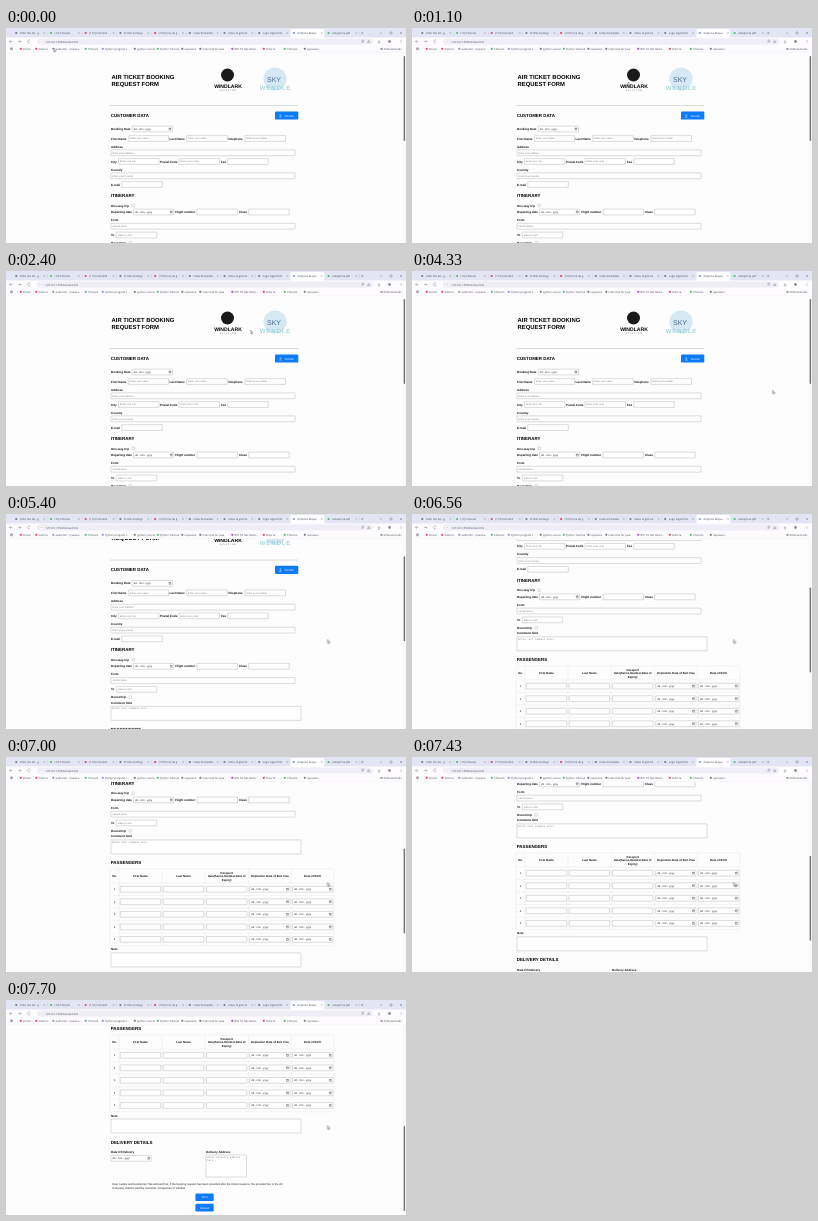
Animation of 400x215 px, one loop 8000 ms. Source, as an HTML page:

```html
<!DOCTYPE html>
<html lang="en">
<head>
<meta charset="utf-8">
<title>Air ticket booking</title>
<style>
  @property --scroll { syntax: "<number>"; inherits: true; initial-value: 0; }

  html, body { margin: 0; width: 100%; height: 100%; overflow: hidden; background: #fefdfe; }
  svg {
    display: block; width: 400px; height: 215px;
    font-family: "Liberation Sans", Arial, sans-serif;
    text-rendering: geometricPrecision;
    animation: scroll 8s linear infinite;
  }
  #page { transform: translateY(calc(var(--scroll) * -1px)); }
  #thumb { transform: translateY(calc(var(--scroll) * .45px)); }
  #cursor { animation: pointer 8s ease-in-out infinite; }

  .title { font-weight: 700; font-size: 5.9px; }
  .head { font-weight: 700; font-size: 4.45px; }
  .label { font-weight: 700; font-size: 3px; fill: #111; }
  .th { font-weight: 700; font-size: 2.9px; fill: #111; text-anchor: middle; }
  .hint { font-size: 2.5px; fill: #808080; }
  .date { font-size: 2.6px; fill: #222; }
  .mono { font-family: "Liberation Mono", monospace; font-size: 2.5px; fill: #808080; }
  .note { font-size: 2.78px; fill: #222; }
  .btn { font-size: 2.8px; fill: #fff; text-anchor: middle; }
  .field { fill: #fff; stroke: #888; stroke-width: .3; }
  .ui { font-family: "Open Sans", sans-serif; font-size: 2.7px; fill: #444a55; }
  .icon { fill: none; stroke: #6a707c; stroke-width: .4; }

  @keyframes scroll {
    0%, 57.875% { --scroll: 0; animation-timing-function: ease-in-out; }
    61.25%, 65.75% { --scroll: 20.8; }
    67.5% { --scroll: 31.5; }
    68.25%, 72.875% { --scroll: 41.6; animation-timing-function: ease-in-out; }
    76.625%, 80% { --scroll: 83.2; }
    82% { --scroll: 101; }
    83.75%, 85.75% { --scroll: 125; }
    87.5% { --scroll: 141; }
    88.75%, 91.625% { --scroll: 146; animation-timing-function: ease-in-out; }
    96.25%, 100% { --scroll: 218; }
  }
  @keyframes pointer {
    0%, .375% { transform: translate(47.5px, 20px); }
    10.375% { transform: translate(222px, 56px); }
    13.75%, 22% { transform: translate(216px, 54px); }
    30%, 32% { transform: translate(244.5px, 59px); }
    42.5% { transform: translate(266px, 58px); }
    50.75%, 57.875% { transform: translate(360.5px, 119px); }
    61.25%, 100% { transform: translate(321.5px, 125.5px); }
  }
</style>
</head>
<body>
<svg viewBox="0 0 400 215">
  <rect width="400" height="215" fill="#fefdfe"/>
  <g id="page"></g>
  <rect x="397" y="25" width="3" height="190" fill="#f9f8fa"/>
  <rect id="thumb" x="397.6" y="28" width="1.5" height="85" rx=".75" fill="#787878"/>
  <g id="browser"></g>
  <path id="cursor" d="M0 0V3.6L.85 2.9 1.4 4.2 1.9 3.9 1.4 2.7H2.5Z" fill="#fff" stroke="#222" stroke-width=".35"/>
</svg>
<script>
const text = (cls, x, y, s, extra = "") => `<text class="${cls}" x="${x}" y="${y}" ${extra}>${s}</text>`;
const rect = (x, y, w, h, fill, r = 0) => `<rect x="${x}" y="${y}" width="${w}" height="${h}" rx="${r}" fill="${fill}"/>`;
const dot = (x, y, r, fill) => `<circle cx="${x}" cy="${y}" r="${r}" fill="${fill}"/>`;
const icon = d => `<path class="icon" d="${d}"/>`;
const box = (x, y, w, h) => `<rect class="field" x="${x}" y="${y}" width="${w}" height="${h}" rx=".3"/>`;

// Form parts; y is the vertical centre of the row
const label = (x, y, s) => text("label", x, y + 1, s);
const input = (x, y, hint = "", w = 40.5) => box(x, y - 2.9, w, 5.8) + text("hint", x + 1.4, y + .9, hint);
const date = (x, y) => box(x, y - 2.9, 40.3, 5.8) +
  text("date", x + 1.6, y + .9, "dd - mm - yyyy") +
  `<path d="M${x + 36.8} ${y - .9}h1.9v1.9h-1.9zm0 .3h1.9" fill="none" stroke="#333" stroke-width=".35"/>`;
const check = (x, y) => `<rect class="field" x="${x}" y="${y - 1.4}" width="2.6" height="2.6" rx=".5"/>`;
const area = (x, y, w, h, ...lines) => box(x, y, w, h) +
  lines.map((s, i) => text("mono", x + 1.2, y + 2.8 + i * 2.9, s)).join("");
const button = (x, y, w, h, s, dx = 0) =>
  rect(x, y, w, h, "#0d7bf8", 1.2) + text("btn", x + w / 2 + dx, y + h / 2 + 1, s);

function passengers() {
  const top = 253, first = 267, pitch = 12.55, rows = 5;
  const cols = [104, 113, 156, 199, 242.5, 285.3, 328];
  const bottom = first + rows * pitch;
  let lines = `M104 ${top}H328`;
  let out = "";
  cols.forEach(x => lines += `M${x} ${top}V${bottom}`);
  for (let i = 0; i <= rows; i++) lines += `M104 ${first + i * pitch}H328`;
  ["No.", "First Name", "Last Name", "", "Expiration Date of Exit Visa", "Date of Birth"].forEach((s, i) =>
    out += text("th", (cols[i] + cols[i + 1]) / 2, 261.4, s));
  ["Passport", "data(Series,Number,Date of", "Expiry)"].forEach((s, i) =>
    out += text("th", 220.7, 257.8 + i * 3.5, s));
  for (let i = 0; i < rows; i++) {
    const y = first + (i + .5) * pitch;
    out += text("note", 108.5, y + 1, i + 1, 'text-anchor="middle"') +
      [114.2, 157.2, 200.4].map(x => input(x, y)).join("") + date(243.7, y) + date(286.5, y);
  }
  return `<path d="${lines}" fill="none" stroke="#dcdcdc" stroke-width=".3"/>` + out;
}

document.getElementById("page").innerHTML = [
  text("title", 105.5, 50.5, "AIR TICKET BOOKING"),
  text("title", 105.5, 57.6, "REQUEST FORM"),
  dot(221.5, 47, 6.5, "#1a1a1a"),
  text("", 222, 59.6, "WINDLARK", 'font-size="5.1" font-weight="700" text-anchor="middle"'),
  text("", 222.3, 63, "AVIATION", 'font-size="2.2" letter-spacing=".9" text-anchor="middle" fill="#666"'),
  dot(269, 51, 11.5, "#d5e8f3"),
  text("", 268, 54.3, "SKY", 'font-size="7" text-anchor="middle" fill="#4a6c92"'),
  text("", 269.5, 62.2, "WENDLE", 'font-size="6" letter-spacing="1" text-anchor="middle" fill="#7cc9cb"'),
  rect(104, 77.5, 188, .4, "#a8a8a8"),

  text("head", 104.7, 89.1, "CUSTOMER DATA"),
  button(269, 83.4, 23.3, 8.2, "Tutorial", 2.2),
  `<path d="M274.3 86v2.3m-.9-.9l.9.9.9-.9M272.9 89.2h2.8" fill="none" stroke="#fff" stroke-width=".4"/>`,
  label(105, 101, "Booking Date"), date(126.2, 101),
  label(105, 110.5, "First Name"), input(122.7, 110.5, "Enter your name", 39.8),
  label(163.5, 110.5, "Last Name"), input(180.7, 110.5, "Enter your name"),
  label(222, 110.5, "Telephone"), input(239, 110.5, "Enter your number"),
  label(105, 118.5, "Address"), input(105, 124.8, "Enter your Address", 184),
  label(105, 133.5, "City"), input(112.5, 133.5, "Enter your city"),
  label(154, 133.5, "Postal Code"), input(173, 133.5, "Enter your code"),
  label(215, 133.5, "Fax"), input(221.8, 133.5),
  label(105, 141.5, "Country"), input(105, 147.8, "Enter your Country", 184),
  label(105, 156.5, "E-mail"), input(115.8, 156.5),

  text("head", 104.7, 169.1, "ITINERARY"),
  label(105, 177.5, "One-way trip"), check(126, 177.5),
  label(105, 184, "Departing date"), date(127.5, 184),
  label(169.2, 184, "Flight number"), input(191, 184),
  label(233, 184, "Class"), input(242.7, 184),
  label(105, 191.7, "Form"), input(105, 198.2, "current place", 184),
  label(105, 207, "To"), input(110.3, 207, "place to visit"),
  label(105, 215, "Round trip"), check(123, 215),
  label(105, 220.5, "Comment field"), area(105, 224, 190, 14, "Write your comment here.."),

  text("head", 104.7, 248.4, "PASSENGERS"),
  passengers(),
  label(105, 333.5, "Note"), area(105, 337, 190, 14),

  text("head", 104.7, 361.6, "DELIVERY DETAILS"),
  label(105, 370.4, "Date Of Delivery"), date(105, 376.3),
  label(200, 370.4, "Delivery Address"), area(200, 373, 40.5, 22, "Enter delivery address", "here"),
  text("note", 106.3, 403, "Dear Ladies and Gentlemen! We advised that, if the booking request has been provided after the ticket issuance, the provided fee to the Air"),
  text("note", 106.3, 406.9, "Company shall be paid by customer, irrespective of whether."),
  button(189.4, 411.5, 18.3, 7.6, "Print"),
  button(189.4, 421.8, 18.3, 7.6, "Upload")
].join("");

const [gray, green, red, blue] = ["#777d88", "#4cc06c", "#e8455a", "#7d9cd0"];
const tabColors = [gray, green, red, gray, red, gray, gray, gray, blue, green];
const tabs = ["Filter the list - g", "(10) Chirvelo", "(173) Immobili", "Profile Settings", "(173) time de g",
  "Index Embedde", "index di git-link", "Logic Algorithm", "Airplane Reque", "anteprima pdf"]
  .map((s, i) => {
    const x = 10.3 + i * 34.7;
    return (i == 8 ? rect(x - 3.5, 1, 34, 9, "#fefdff", 1.6) : rect(x + 31, 3.2, .3, 3.6, "#b9bfd0")) +
      dot(x, 5, 1.1, tabColors[i]) + text("ui", x + 3.6, 6, s) +
      icon(`M${x + 27.3} 4.4l1.2 1.2m0-1.2l-1.2 1.2`);
  }).join("");

const bookmarks = [
  [17, "Postel", red], [32.5, "Vidorra", red], [49.5, "authentic - Quessa..", blue],
  [82, "Chirvelo", green], [99, "Python program t..", blue], [131, "python course", gray],
  [154, "Python Tutorial", green], [178.5, "repovane", gray], [196.5, "interviste for Java", gray],
  [228.5, "BTC fd: Net Resto..", "#9a55c8"], [260, "Vidorra", red], [281, "Chirvelo", green],
  [301, "repovane", gray]
].map(([x, s, c]) => dot(x - 2.2, 20.8, 1.1, c) + text("ui", x, 21.7, s)).join("");

document.getElementById("browser").innerHTML = [
  rect(0, 0, 400, 10, "#e3e5f4"),
  rect(0, 9.4, 400, 15.6, "#fdfbfe"),
  tabs,
  icon("M355 5h2.4m-1.2-1.2v2.4M374 5h2M384 4h2v2h-2zM394 4l2 2m0-2l-2 2"),
  icon("M6.5 13.5H3.5l1.3-1.3M3.5 13.5l1.3 1.3M12 13.5h3l-1.3-1.3M15 13.5l-1.3 1.3M24.3 12.6a1.5 1.5 0 1 0 .1 1.5"),
  rect(31, 10.6, 336, 5.8, "#efeef7", 2.9),
  dot(35.5, 13.5, 1.5, "#fff"), icon("M34.8 13.5h1.5"),
  text("ui", 39.7, 14.5, "127.0.0.1:5500/index.html", 'font-size="2.8"'),
  icon("M356.4 14.2l-.9.9M357.8 13a1 1 0 1 1-2 0a1 1 0 1 1 2 0M361.5 14.5l1.2-2.1 1.2 2.1zM373 12.3v2m-1-1l1 1 1-1M371.8 15h2.4"),
  dot(383.5, 13.5, 1.4, "#8b8fa0"),
  [12.3, 13.5, 14.7].map(y => dot(395, y, .3, "#444")).join(""),
  icon("M4.5 19.8h2v2h-2zm1 0v2m-1-1h2"),
  bookmarks,
  rect(374.5, 20, 2, 1.7, "#858b97", .3),
  text("ui", 377.6, 21.7, "All Bookmarks"),
  rect(0, 24.8, 400, .2, "#e6e4ec")
].join("");
</script>
</body>
</html>
```
